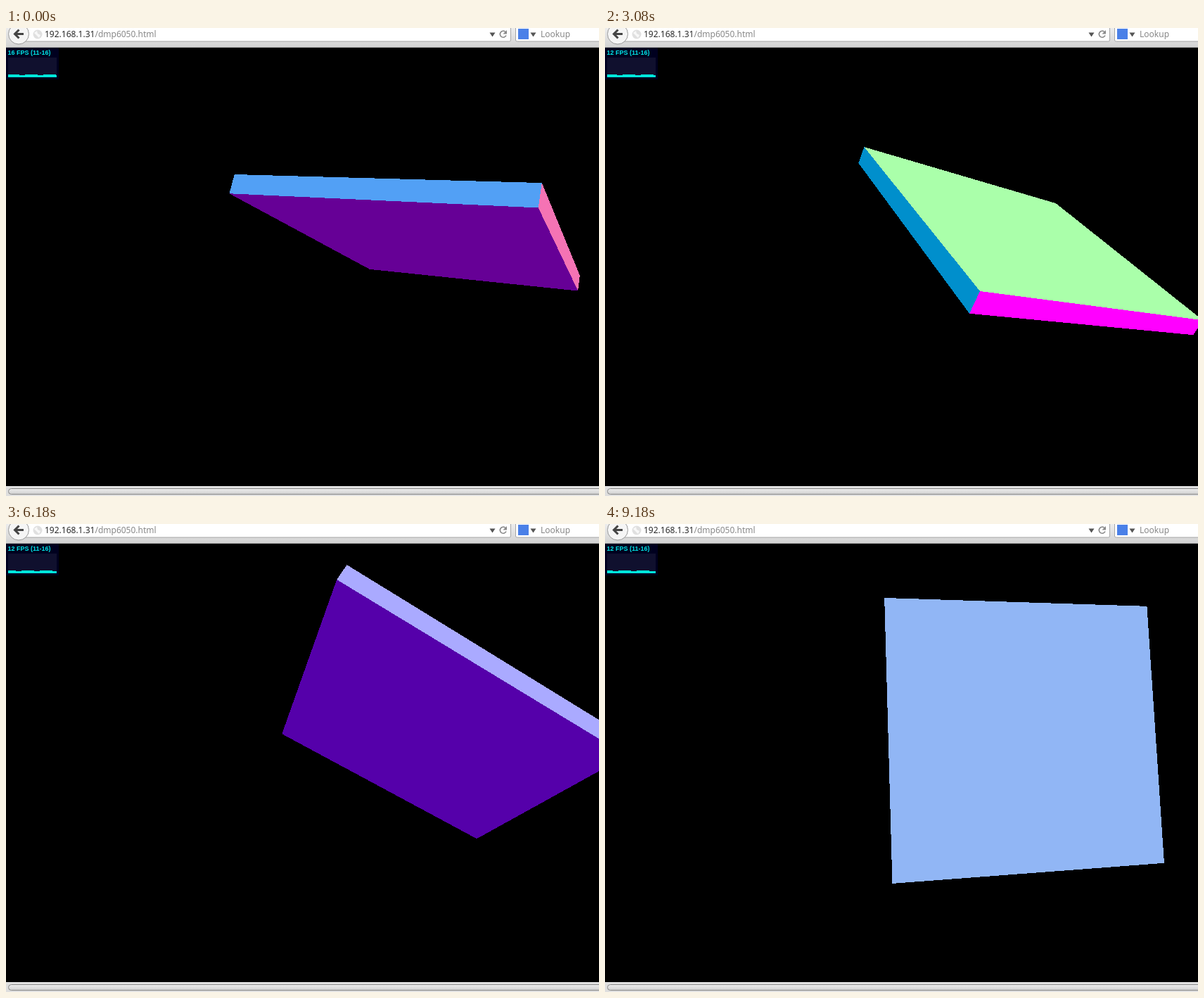
Recreate the animation shown at these times as an HTML page. Size 843x665 px, loop 9.23 s.

```html
<!DOCTYPE html>
<html lang="en">
<head>
<meta charset="utf-8">
<title>Board orientation</title>
<style>
  html, body { margin: 0; width: 100%; height: 100%; overflow: hidden; background: #000; }
  svg { display: block; }
  .ui { font: 12px "Noto Sans", "Open Sans", sans-serif; }
  .fps { font: bold 9px "Liberation Sans", Arial, sans-serif; fill: #00e6e8; }
  #box { shape-rendering: crispEdges; }
</style>
</head>
<body>
<svg width="843" height="665" viewBox="0 0 843 665">
  <defs>
    <linearGradient id="bar" x2="0" y2="1"><stop stop-color="#ececec"/><stop offset="1" stop-color="#d2d2d2"/></linearGradient>
    <linearGradient id="thumb" x2="0" y2="1"><stop stop-color="#eee"/><stop offset="1" stop-color="#cfcfcf"/></linearGradient>
  </defs>
  <rect width="843" height="665"/>
  <g id="box"></g>

  <g id="stats">
    <rect y="28" width="75" height="45" fill="#00001f"/>
    <text id="fps" class="fps" x="2.5" y="38"></text>
    <rect x="3" y="42" width="69" height="28" fill="#10102e"/>
    <path id="bars" fill="#00e6dc" shape-rendering="crispEdges"/>
  </g>

  <g class="ui">
    <rect width="843" height="28" fill="url(#bar)"/>
    <path d="M0 27.5H843" stroke="#a0a0a0"/>
    <path d="M26-2H717.5V17q0 2-2 2H26zM846 19H726.5q-2 0-2-2V-2H846z" fill="#fff" stroke="#a6a6a6"/>
    <circle cx="18" cy="8.5" r="14.5" fill="#f5f5f5" stroke="#999"/>
    <path d="M25 8.5H13M18.5 2.5L12.5 8.5L18.5 14.5" fill="none" stroke="#444" stroke-width="3"/>
    <circle cx="45" cy="9" r="6.5" fill="#e0e0e0"/>
    <path d="M40 7l4-3 1 4 4 2-2 4-3-3z" fill="#f8f8f8"/>
    <text x="55" y="13" fill="#2a2a2a">192.168.1.31<tspan fill="#888">/dmp6050.html</tspan></text>
    <path d="M687.5 6.5h8l-4 6zM745.5 6.5h8l-4 6z" fill="#555"/>
    <path d="M710 5.5a4.5 4.5 0 1 0 1 5" fill="none" stroke="#8a8a8a" stroke-width="1.7"/>
    <path d="M712 3v5.5h-5.5z" fill="#8a8a8a"/>
    <rect x="728" y="1" width="15" height="15" fill="#4a80e8"/>
    <text x="760" y="13" fill="#888">Lookup</text>
  </g>

  <rect y="651" width="843" height="14" fill="#dedede"/>
  <path d="M0 651.5H843" stroke="#f2f2f2"/>
  <rect x="3.5" y="654.5" width="860" height="8" rx="4" fill="url(#thumb)" stroke="#888"/>
</svg>
<script>
const LOOP = 9230;
const FOCAL = 752, CENTER_X = 600, CENTER_Y = 339.5;
const POSITION = [0, -38.2, 752];
const HALF = { u: 190.5, v: 190.5, d: 12.7 };

// u: board's right, v: board's front (x right, y down, z away); paint: shown face colours
const poses = [
  { t: 0, u: [.918, .089, -.386], v: [-.354, -.249, -.901], paint: { 'v+': '52a0f5', 'd+': '660096', 'u+': 'f573b4' } },
  { t: 1260, u: [.984, .114, -.137], v: [-.178, .472, -.864], paint: { 'd-': 'aaffaa', 'v+': '4b70ff' } },
  { t: 3080, u: [.499, .511, -.700], v: [-.757, -.135, -.639], paint: { 'd-': 'aaffaa', 'v+': '008fcc', 'u+': 'ff00ff' } },
  { t: 4490, u: [.813, .552, -.184], v: [-.146, -.112, -.983], paint: { 'v+': '6699ff', 'd+': '001991' } },
  { t: 6180, u: [.860, .479, .177], v: [.378, -.378, -.845], paint: { 'd+': '5500aa', 'v+': 'aaaaff' } },
  { t: 7230, u: [.855, .490, .172], v: [.487, -.640, -.595], paint: { 'd+': '5500ff', 'v+': 'bac3d0' } },
  { t: 9180, u: [.978, -.031, .205], v: [-.050, -.996, .077], paint: { 'd+': '91b6f5' } }
];

const add = (a, b, k = 1) => a.map((x, i) => x + k * b[i]);
const scale = (a, k) => a.map(x => x * k);
const dot = (a, b) => a[0] * b[0] + a[1] * b[1] + a[2] * b[2];
const unit = a => scale(a, 1 / Math.sqrt(dot(a, a)));
const cross = (a, b) => [a[1] * b[2] - a[2] * b[1], a[2] * b[0] - a[0] * b[2], a[0] * b[1] - a[1] * b[0]];
const project = p => [CENTER_X + FOCAL * p[0] / p[2], CENTER_Y + FOCAL * p[1] / p[2]];

function frameOf(u, v) {
  u = unit(u);
  v = unit(add(v, u, -dot(u, v)));
  return { u, v, d: cross(u, v) };
}

const normalColor = n => [n[0], -n[1], -n[2]].map(x => 127.5 * (1 + x));
const faceNormal = (axes, face) => scale(axes[face[0]], face[1] === '+' ? 1 : -1);
const parseHex = hex => [0, 2, 4].map(i => parseInt(hex.slice(i, i + 2), 16));

// Difference between the shown colour and the pure normal colour
for (const pose of poses) {
  const axes = frameOf(pose.u, pose.v);
  pose.shift = {};
  for (const face in pose.paint)
    pose.shift[face] = add(parseHex(pose.paint[face]), normalColor(faceNormal(axes, face)), -1);
}

function slope(i, key) {
  const a = poses[Math.max(i - 1, 0)], b = poses[Math.min(i + 1, poses.length - 1)];
  return scale(add(b[key], a[key], -1), 1 / (b.t - a.t));
}

function spline(i, s, key) {
  const a = poses[i], b = poses[i + 1], span = b.t - a.t;
  const ease = s * s * (3 - 2 * s);
  let p = add(scale(a[key], 1 - ease), b[key], ease);
  p = add(p, slope(i, key), span * s * (1 - s) ** 2);
  return add(p, slope(i + 1, key), span * s * s * (s - 1));
}

const svgBox = document.getElementById('box');
const polygons = {};
for (const face of ['u+', 'u-', 'v+', 'v-', 'd+', 'd-'])
  polygons[face] = svgBox.appendChild(document.createElementNS('http://www.w3.org/2000/svg', 'polygon'));

function drawBox(t) {
  let i = 0;
  while (i < poses.length - 2 && t >= poses[i + 1].t) i++;
  const a = poses[i], b = poses[i + 1];
  const s = Math.min(1, (t - a.t) / (b.t - a.t));
  const axes = frameOf(spline(i, s, 'u'), spline(i, s, 'v'));
  const none = [0, 0, 0];

  for (const face in polygons) {
    const normal = faceNormal(axes, face);
    const middle = add(POSITION, normal, HALF[face[0]]);
    const visible = dot(normal, middle) < 0;
    polygons[face].style.display = visible ? '' : 'none';
    if (!visible) continue;
    const [p, q] = ['u', 'v', 'd'].filter(k => k !== face[0]);
    const corners = [[-1, -1], [1, -1], [1, 1], [-1, 1]].map(([j, k]) =>
      project(add(add(middle, axes[p], j * HALF[p]), axes[q], k * HALF[q])).map(x => x.toFixed(2)));
    let color = add(normalColor(normal), a.shift[face] || none, 1 - s);
    color = add(color, b.shift[face] || none, s);
    polygons[face].setAttribute('points', corners.join(' '));
    polygons[face].setAttribute('fill', `rgb(${color.map(c => Math.max(0, Math.min(255, Math.round(c))))})`);
  }
}

const rates = [16, 15, 12, 14, 14, 12, 15, 12, 12];
const fpsText = document.getElementById('fps');
const bars = document.getElementById('bars');

function drawStats(t) {
  const tick = Math.max(0, Math.floor((t - 50) / 1050));
  fpsText.textContent = `${rates[tick]} FPS (11-16)`;
  let path = '';
  for (let x = 0; x < 69; x++) {
    const height = Math.sin((x + tick) * .24) > -.55 ? 4 : 3;
    path += `M${3 + x} 70v${-height}h1v${height}z`;
  }
  bars.setAttribute('d', path);
}

const start = performance.now();
function draw() {
  const t = (performance.now() - start) % LOOP;
  drawBox(t);
  drawStats(t);
  requestAnimationFrame(draw);
}
draw();
</script>
</body>
</html>
```
